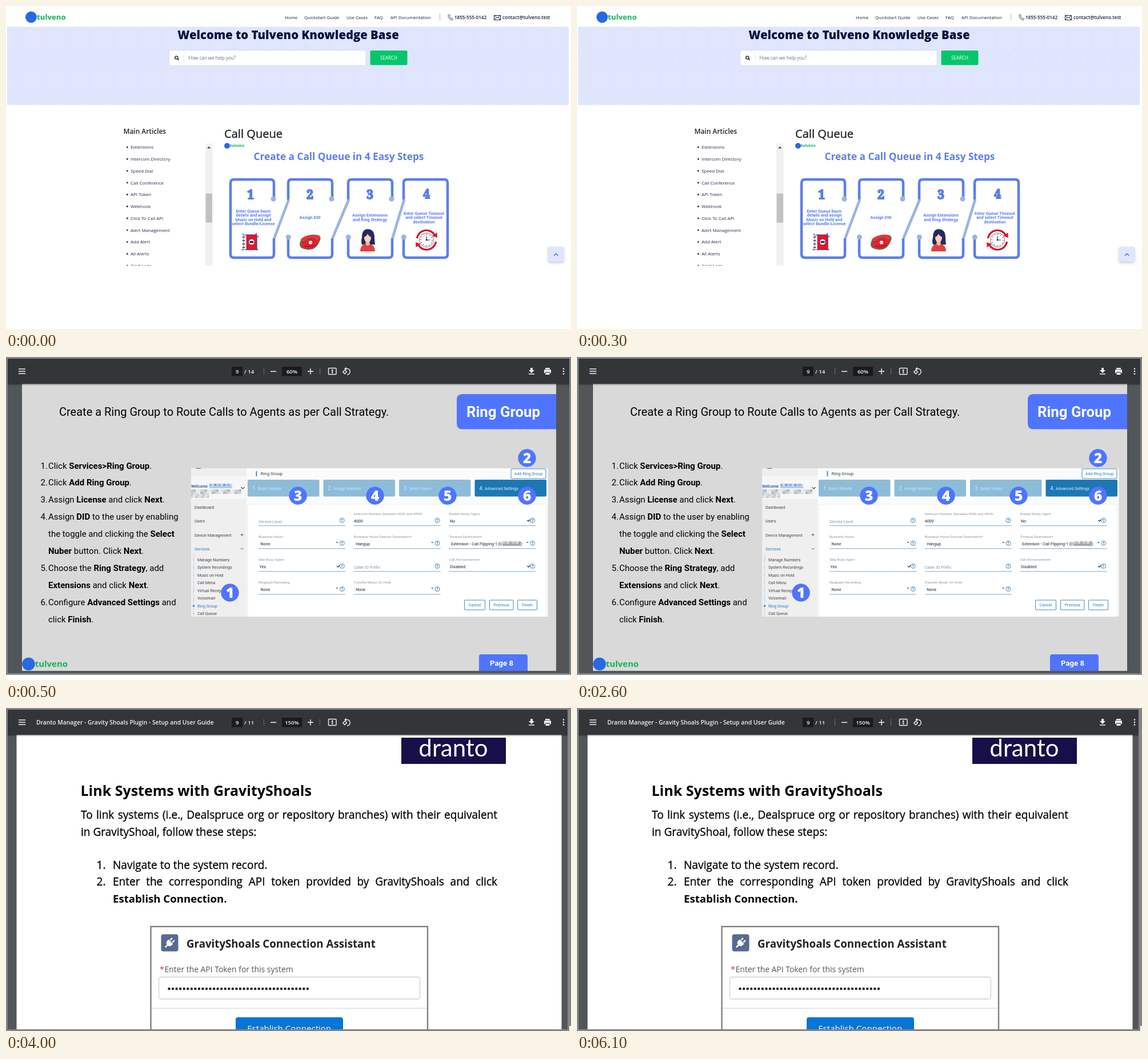
Animation of 989x566 px, one loop 7500 ms. Source, as an HTML page:

```html
<!DOCTYPE html>
<html lang="en">
<head>
<meta charset="utf-8">
<title>Help pages</title>
<style>
  html, body { margin: 0; width: 100%; height: 100%; overflow: hidden; background: #fff; }
  svg { display: block; width: 989px; height: 566px; }
  .open { font-family: "Open Sans", "Noto Sans", sans-serif; }
  .roboto { font-family: Roboto, Arial, sans-serif; }
  .justify { font: 19.06px/29.2px "Open Sans", "Noto Sans", sans-serif; text-align-last: justify; white-space: nowrap; -webkit-text-stroke: .3px #000; }
</style>
</head>
<body>
<svg id="stage" viewBox="0 0 989 566"></svg>
<script>
const BLUE = '#4f74ff', CARD = '#5b7fe8', PALE = '#9db3e0', LINK = '#2e7cb8', RED = '#e0182d';

// Markup helpers; {braces} in a text mark a bold run.
const text = (x, y, size, str, fill = '#000', more = '') =>
  `<text x="${x}" y="${y}" font-size="${size}" fill="${fill}" ${more}>` +
  str.replace(/{(.+?)}/g, '<tspan font-weight="700">$1</tspan>') + '</text>';
const rect = (x, y, w, h, fill, more = '') =>
  `<rect x="${x}" y="${y}" width="${w}" height="${h}" fill="${fill}" ${more}/>`;
const circle = (x, y, r, fill, more = '') => `<circle cx="${x}" cy="${y}" r="${r}" fill="${fill}" ${more}/>`;
const path = (d, stroke, width = 1, more = 'fill="none"') =>
  `<path d="${d}" stroke="${stroke}" stroke-width="${width}" ${more}/>`;
const shape = (d, fill) => `<path d="${d}" fill="${fill}"/>`;
const group = (cls, ...parts) => `<g class="${cls}">${parts.flat(2).join('')}</g>`;
const outline = (color, width) => `stroke="${color}" stroke-width="${width}"`;
const MID = 'text-anchor="middle"', BOLD = 'font-weight="700"', SEMI = 'font-weight="600"';

const brand = (x, y, r) => group('open',
  circle(x, y, r, '#2869e2'),
  text(x + r, y + r * .48, r * 1.32, 'tulveno', '#0fb457', BOLD));

const mosaic = (x, y, cols, rows, size, colors) =>
  Array.from({ length: cols * rows }, (_, k) => {
    const i = k % cols, j = Math.floor(k / cols);
    return rect(x + i * size, y + j * size, size, size, colors[(i * 7 + j * 5 + i * j) % colors.length]);
  }).join('');

// ---------- knowledge base ----------
function knowledgeBase() {
  const nav = [[488, 'Home'], [522, 'Quickstart Guide'], [596, 'Use Cases'], [645, 'FAQ'], [673, 'API Documentation']];
  const articles = ['Extensions', 'Intercom Directory', 'Speed Dial', 'Call Conference', 'API Token', 'Webhook',
    'Click To Call API', 'Alert Management', 'Add Alert', 'All Alerts', 'Alert Logs'];
  const ink = '#1c2140';

  const header = [
    rect(0, 0, 989, 37, '#fff'), rect(2, 36.5, 983, 1, '#e3e6f0'),
    brand(44, 19.5, 10),
    nav.map(([x, label]) => text(x, 22.5, 7.85, label, ink)),
    rect(759, 13, 1, 12, '#b9bcc8'),
    path('M774 16l2-1 1.5 2.5-1 1.5q.8 2 2.8 3l1.5-.8 1.5 2-1 1.5q-2 .6-5-2.5t-2.3-6.2z', ink, .8),
    text(785, 22.5, 8.1, '1855-555-0142', ink, SEMI),
    path('M854.5 16.5h11v8h-11zl5.5 4.5 5.5-4.5M854.5 24.5l4-4.5M865.5 24.5l-4-4.5', ink, 1),
    text(869, 22.5, 8.1, 'contact@tulveno.test', ink, SEMI)];

  const hero = [
    rect(2, 37, 983, 136.5, '#dfe6fd'), rect(2, 37, 983, 136.5, 'url(#cubes)'),
    text(494, 58, 20.3, 'Welcome to Tulveno Knowledge Base', '#051040', MID + ' font-weight="800"'),
    rect(286.5, 78.5, 343, 25, '#fff', 'rx="2"'), rect(311, 83, .8, 16, '#e4e6ea'),
    circle(298.3, 90.5, 2.6, 'none', outline('#222', 1.4)), path('M300.3 92.5l2.3 2.3', '#222', 1.6),
    text(319.5, 94, 8.03, 'How can we help you?', '#6b7280'),
    rect(637.5, 78, 65, 25.5, '#06c66c', 'rx="2"'),
    text(670, 94, 8.05, 'SEARCH', '#fff', MID)];

  const sidebar = [
    text(205.5, 224, 11.9, 'Main Articles', '#212529', SEMI),
    '<g clip-path="url(#list)">', articles.map((label, i) => {
      const y = 247.4 + i * 20.77;
      return circle(212.3, y, 1.4, ink) + text(218, y + 2.8, 7.95, label, '#252a48');
    }), '</g>',
    rect(349, 241, 12.5, 214, '#f1f1f1'), rect(349.5, 328.5, 11.5, 51, '#c1c1c1'),
    shape('M352 249.5l3.2-3.5 3.2 3.5z', '#444')];

  const article = [
    text(382, 231, 20.1, 'Call Queue', '#212529', outline('#212529', .4)),
    brand(387, 245, 5),
    text(582.5, 270, 17.2, 'Create a Call Queue in 4 Easy Steps', CARD, MID + ' ' + BOLD),
    steps()];

  const toTop = [
    rect(949, 422, 27, 26, '#dfe6fd', 'rx="3" filter="url(#soft)"'),
    path('M959 437.5l3.7-3.5 3.7 3.5', '#4a63d8', 1.3)];

  return group('open', rect(0, 0, 989, 566, '#fff'), hero, header, sidebar, article, toTop);
}

function steps() {
  const cards = [[393, 469], [494, 571], [599, 676], [696, 773]];
  const top = 304, bottom = 441, r = 6;
  const captions = [
    [433, 361.7, ['Enter Queue basic', 'details and assign', 'Music on Hold and', 'select Bundle/License']],
    [532, 373, ['Assign DID']],
    [637, 369, ['Assign Extensions', 'and Ring Strategy']],
    [731.5, 365.6, ['Enter Queue Timeout', 'and select Timeout', 'destination']]];
  const frames = cards.map(([left, right], i) => {
    const first = i === 0, last = i === 3;
    const upper = `M${left} ${first ? 372 : 340}V${top + r}q0-${r} ${r}-${r}H${right - r}q${r} 0 ${r} ${r}V${last ? 372 : 338}`;
    const lower = `M${left} ${first ? 372 : 405}V${bottom - r}q0 ${r} ${r} ${r}H${right - r}q${r} 0 ${r}-${r}V${last ? 372 : 407}`;
    return path(upper + lower, CARD, 4.5);
  });
  const links = cards.slice(1).map(([left], i) => {
    const right = cards[i][1];
    return path(`M${left + 1} 339L${right + .5} 407`, PALE, 4.6) +
      circle(right - 1, 338, 4.5, PALE) + circle(left + .3, 405, 4.5, PALE);
  });
  const numbers = [428, 532, 637, 736].map((x, i) =>
    text(x, i === 3 ? 336.5 : 337.5, 21, String(i + 1), CARD,
      `${MID} font-weight="900" font-family="Noto Serif, serif" ${outline(CARD, 1.8)}`));
  const labels = captions.map(([x, y, lines]) =>
    lines.map((line, i) => text(x, y + i * 7.5, 7.5, line, CARD, MID + ' ' + BOLD)));
  return frames.join('') + links.join('') + numbers.join('') + group('roboto', labels) + icons();
}

function icons() {
  const navy = '#26305c';
  const book = [
    rect(420, 401, 19, 26, '#f0102a', outline(navy, 1)), rect(416, 402, 5, 25, '#fff', outline(navy, .7)),
    [405, 411, 417, 423].map(y => path(`M413.5 ${y}h5`, navy, 1.4)),
    circle(430, 413.5, 5.2, '#fff', outline(navy, .7)), rect(426.5, 411.8, 7, 3.4, navy, 'rx="1"'),
    [[415, 400], [438, 399], [441, 404], [414, 427], [440, 427]].map(([x, y]) => path(`M${x - 1.5} ${y}h3m-1.5-1.5v3`, navy, .8))];
  const phone = [
    shape('M514 417q1-9 9-13 14-6 25-2 4 3 2 8-4 12-13 16-11 3-20-2-3-2-3-7z', '#1c9a4c'),
    shape('M515.5 418q3-8 10-10l21-3q4 2 2 6-4 10-12 14-11 2-18-2-3-2-3-5z', '#ea2030'),
    shape('M516 409q8-9 27-8 7 1 6 6l-6 3q-2-5-9-4-7 0-8 5l-8 2q-3-1-2-4z', '#f0303c'),
    path('M516 413q4 2 9-1 1-5 9-5 6 0 9 4', '#17643a', .8),
    circle(533, 414.5, 4.2, '#ffd9d4', outline('#a91525', 1.5)),
    path('M522 420q9 4 20-1', '#8d1020', 1.1)];
  const woman = [
    shape('M623 418q-2-6 0-12 0-15 10-15 12 0 12 15 0 7 1 12z', '#222b61'),
    shape('M620 430q0-11 9-13h8q9 2 9 13z', '#e5403f'),
    shape('M629.5 411h7v7q-3.5 4-7 0z', '#f2b99c'),
    '<ellipse cx="633" cy="406" rx="6" ry="8" fill="#ffd0b5"/>',
    shape('M626 405q1-8 8-9 6 2 6 9-5-1-7-6-2 5-7 6z', '#222b61')];
  const arrows = 'M719.5 407a16.5 16.5 0 0 1 31-5M752.5 413a16.5 16.5 0 0 1-31 5';
  const clock = [
    circle(736, 410, 12.5, '#fff', outline('#666', .9)),
    circle(736, 410, 10, 'none', outline('#444', 1.8) + ' stroke-dasharray="1 4.236"'),
    path('M736 403v7h6', '#333', 1.1), circle(736, 410, 1.4, '#333'),
    path(arrows, '#7d2730', 3.2), path(arrows, RED, 2.2),
    shape('M746 403l9 3-.5-9zM726 417l-9-3 .5 9z', RED)];
  return [book, phone, woman, clock].flat(2).join('');
}

// ---------- document viewer ----------
function viewer(bottom, right, title, pages, zoom) {
  const white = '#f1f1f1', box = '#191b1c';
  return group('open',
    rect(0, 0, 989, bottom, '#848484'), rect(3, 3, right - 3, bottom - 6, '#525659'),
    rect(3, 3, right - 3, 44, '#323639'),
    path('M22 21h12M22 25h12M22 29h12', white, 1.6),
    text(53, 29.3, 10.3, title, white, SEMI),
    rect(395, 17, 19, 16.5, box), text(404.7, 29, 9.7, '9', white, MID + ' ' + SEMI),
    text(417, 29, 9.7, '/ ' + pages, white, SEMI),
    rect(451, 19, 1, 12, '#6b6e71'), path('M463 25.3h10', white, 1.5),
    rect(483, 17, 35, 16.5, box), text(500.5, 29, 9.6, zoom, white, MID + ' ' + SEMI),
    path('M528 25.3h10M533 20.3v10', white, 1.5), rect(549, 19, 1, 12, '#6b6e71'),
    rect(564.5, 19.5, 13.5, 11, 'none', 'rx="1" ' + outline(white, 1.4)),
    shape('M571.2 21.3l2 2.5h-4zM571.2 29l2-2.5h-4zM570.5 23h1.4v4h-1.4z', white),
    path('M593 20.5h4a5 5 0 0 1 0 10.5M593 23l3.4 3.3-3.4 3.3-3.3-3.3z', white, 1.4),
    shape('M595.5 17.5v6l-3.3-3z', white),
    shape('M918 19h4v4h3l-5 5-5-5h3zM915 29h10v1.6h-10z', white),
    shape('M944 19h8v2.5h-8zM942 22.3h12v6h-2v-2h-8v2h-2zM944.5 27.5h7v3.5h-7z', white),
    [20.5, 25, 29.5].map(y => circle(976, y, 1.35, white)));
}

const toolbarShadow = right => rect(3, 47, right - 3, 3, 'url(#shade)');

// ---------- ring group page ----------
function ringGroup() {
  const lines = ['Click {Services&gt;Ring Group}.', 'Click {Add Ring Group}.', 'Assign {License} and click {Next}.',
    'Assign {DID} to the user by enabling', 'the toggle and clicking the {Select}', '{Nuber} button. Click {Next}.',
    'Choose the {Ring Strategy}, add', '{Extensions} and click {Next}.', 'Configure {Advanced Settings} and', 'click {Finish}.'];
  const numbered = [0, 1, 2, 3, 6, 8];
  const badges = [[392, 413], [912, 177], [511, 243], [646, 243], [773, 243], [912, 243]];
  return viewer(557, 986, '', 14, '60%') + group('roboto',
    rect(28, 47, 935, 503, '#d9d9d9'), toolbarShadow(986),
    text(93, 103, 20, 'Create a Ring Group to Route Calls to Agents as per Call Strategy.'),
    shape('M963 65H799q-10 0-10 10v41.5q0 10 10 10H963z', BLUE),
    text(870.5, 105, 25.8, 'Ring Group', '#fff', MID + ' ' + BOLD),
    lines.map((line, i) => text(74, 195.5 + i * 29.95, 15, line)),
    numbered.map((row, i) => text(60.5, 195.5 + row * 29.95, 15, i + 1 + '.')),
    settings(),
    badges.map(([x, y], i) =>
      circle(x, y, 15.7, BLUE) + text(x, y + 9, 25, String(i + 1), '#fff', MID + ' class="open" font-weight="800"')),
    shape('M828 550V525q0-4 4-4h77q4 0 4 4v25z', BLUE),
    text(867.5, 541, 13.2, 'Page 8', '#fff', MID + ' ' + BOLD),
    brand(39.5, 538, 11.3));
}

function settings() {
  const dark = '#3c4043', gray = '#8d9298';
  const menu = ['Manage Numbers', 'System Recordings', 'Music on Hold', 'Call Menu', 'Virtual Recep', 'Voicemail', 'Ring Group', 'Call Queue'];
  const tabs = ['Basic Details', 'Assign Number', 'Select Users', 'Advanced Settings'];
  // Label, value and selector kind ('a' arrow, 'c' chevron), row by row.
  const fields = [
    ['', 'Service Level'], ['Intercom Number (between 4000 and 4999)', '4000'], ['Enable Sticky Agent', 'No', 'c'],
    ['Business Hours', 'None', 'a'], ['Business Hours Failover Destination*', 'Hangup', 'a'], ['Timeout Destination*', 'Extension - Call Flipping-1 (01', 'a'],
    ['Skip Busy Agent', 'Yes', 'c'], ['', 'Caller ID Prefix'], ['Call Announcement', 'Disabled', 'c'],
    ['Ringback Recording', 'None', 'a'], ['Transfer Music On Hold', 'None', 'a']];
  const button = (x, y, w, label) =>
    rect(x, y, w, 17, '#fff', 'rx="1" ' + outline(LINK, .9)) + text(x + w / 2, y + 11, 7.1, label, LINK, MID);

  const side = [
    rect(324, 195, 97.5, 260, '#efeff0'), rect(333, 194.5, 8, 1.3, '#3a9b78'),
    rect(324, 209, 97.5, 40, '#f7f7f8'),
    text(324, 229, 7, 'Welcome', '#2148b8', 'font-weight="500"'),
    mosaic(356, 222, 10, 2, 4, ['#8fb3ea', '#b5cbee', '#76a0e2', '#cfdcf2']),
    mosaic(324, 232, 22, 2, 4, ['#c9cbcf', '#e3e4e6', '#b4b7bc', '#d6d8db', '#eeeef0']),
    mosaic(324, 240, 9, 2, 3.5, ['#c4c6ca', '#e6e7e9', '#d3d5d8']),
    path('M411.5 228l3 3 3-3', '#444', 1.1),
    [['Dashboard', 265.7], ['Users', 290], ['Device Management', 314.6], ['Services', 339.2]].map(([label, y], i) =>
      text(330, y, 7.1, label, i === 3 ? LINK : dark)),
    path('M410.5 311.5h5M413 309v5M410.5 336h5', '#555', .9),
    path('M328.5 346V455', '#b9cfdf', .8),
    menu.map((label, i) => {
      const y = 358 + i * 13.45, active = i === 6;
      return circle(328.5, y - 2.5, active ? 1.6 : 1, active ? LINK : '#a9c6db') + text(335, y, 7.1, label, active ? LINK : dark);
    })];

  const main = [
    rect(437.5, 200, 1.8, 9, '#2b84c8'), text(445.5, 207.3, 7.9, 'Ring Group', dark), button(884, 196, 61, 'Add Ring Group'),
    tabs.map((label, i) => {
      const x = 423 + i * 132.5, ink = i === 3 ? '#e4f0f8' : '#d3e6f1';
      return rect(x, 215, 125.5, 29.5, i === 3 ? '#1c78b4' : '#8dbcd9', 'rx="2"') +
        text(x + 8, 232.8, 9, i + 1 + '.', ink) + text(x + 17.5, 232.6, 7.1, label, ink);
    }),
    rect(423, 258, 523, 200, '#fff', 'rx="3" ' + outline('#e4e6e8', .8)),
    fields.map(([label, value, kind], i) => {
      const x = 442 + (i % 3) * 166.7, y = 295.5 + Math.floor(i / 3) * 40.1;
      const indent = kind === 'a' ? 3.5 : kind === 'c' ? 1.5 : 0;
      return text(x, y - 18.8, 6.2, label, gray) +
        text(x + indent, y - (label ? 6 : 5), 7.1, value, label ? '#222' : gray) +
        rect(x, y - .3, 152, .9, '#6a9fc4') +
        circle(x + 146.3, y - 9.3, 4, '#fff', outline(LINK, .9)) +
        text(x + 146.3, y - 6.8, 6.8, '?', LINK, MID + ' ' + BOLD) +
        (kind === 'a' ? shape(`M${x + 135.5} ${y - 11.5}h4l-2 2.2z`, '#555') : '') +
        (kind === 'c' ? path(`M${x + 137} ${y - 9.5}l2 2 3-3`, '#222', 1.2) : '');
    }),
    mosaic(869, 323, 8, 2, 4, ['#cfcfd1', '#a8a8ac', '#dededf', '#bcbcc0']), text(901, 329.6, 7.1, ')', '#222'),
    button(802.5, 426, 36, 'Cancel'), button(846.5, 426, 41.5, 'Previous'), button(895.5, 426, 34, 'Finish')];

  return `<g clip-path="url(#shot)">${[rect(324, 195, 624.5, 260, '#fbfbfb'), side, main].flat(2).join('')}</g>`;
}

// ---------- link systems page ----------
function linkSystems() {
  const justified = (x, baseline, str) =>
    `<foreignObject x="${x}" y="${baseline - 22}" width="${860 - x}" height="32"><div class="justify">${str}</div></foreignObject>`;
  const body = (x, y, str) => text(x, y, 19.06, str, '#000', outline('#000', .3));
  return rect(0, 557, 989, 9, '#fff') +
    viewer(566, 983, 'Dranto Manager - Gravity Shoals Plugin - Setup and User Guide', 11, '150%') +
    rect(986, 557, 3, 9, '#fff') + group('open',
      '<g clip-path="url(#page)">',
      rect(18.5, 47, 954, 520, '#fff'), toolbarShadow(983),
      rect(692, 52, 183, 46, '#170f4a'),
      text(783, 85, 42, 'dranto', '#fff', MID + ' font-family="Lato, sans-serif"'),
      text(130.5, 154, 25, 'Link Systems with GravityShoals', '#000', BOLD),
      justified(131, 194.7, 'To link systems (i.e., Dealspruce org or repository branches) with their equivalent'),
      body(131, 223.7, 'in GravityShoal, follow these steps:'),
      body(158.5, 282, '1.'), body(187, 282, 'Navigate to the system record.'),
      body(158.5, 311.4, '2.'),
      justified(187, 311.7, 'Enter the corresponding API token provided by GravityShoals and click'),
      text(187, 341, 18.6, 'Establish Connection.', '#000', BOLD),
      rect(253.5, 383, 484.5, 200, '#fff', outline('#7f7f7f', 2.4)),
      rect(271.5, 396.5, 30, 30, '#566a93', 'rx="4"'),
      '<g transform="translate(286.5 411.5) rotate(45)">',
      shape('M-5.5-3h11v3q0 5-4 5.5h-3q-4-.5-4-5.5zM-4-9h2.5v5H-4zM1.5-9H4v5H1.5zM-1.2 5h2.4v6h-2.4z', '#fff'), '</g>',
      text(316, 419.5, 18.7, 'GravityShoals Connection Assistant', '#222', BOLD),
      text(269, 462.5, 13.9, '*', '#c23934'), text(277.5, 462.5, 13.9, 'Enter the API Token for this system', '#555'),
      rect(267.5, 471.5, 457, 38.5, '#fff', 'rx="4" ' + outline('#cfcfcf', 1.3)),
      path('M285.5 492H528.5', '#222', 4.6, 'stroke-dasharray="0 6.55" stroke-linecap="round"'),
      rect(255, 525.5, 482, 1.2, '#d4d4d4'),
      rect(402, 542, 188, 40, '#0575d6', 'rx="4"'),
      text(495.7, 567, 15.1, 'Establish Connection', '#fff', MID),
      '</g>');
}

const defs = `<defs>
  <pattern id="cubes" width="42" height="72" patternUnits="userSpaceOnUse">
    <path d="M0 12L21 0 42 12V36L21 48 0 36zL21 24 42 12M21 24V72" fill="none" stroke="#dae1fa" stroke-width=".9"/></pattern>
  <linearGradient id="shade" x2="0" y2="1"><stop stop-opacity=".4"/><stop offset="1" stop-opacity="0"/></linearGradient>
  <filter id="soft" x="-50%" y="-50%" width="200%" height="200%"><feDropShadow dx="0" dy="2" stdDeviation="2.5" flood-color="#506090" flood-opacity=".35"/></filter>
  <clipPath id="list"><rect x="200" y="238" width="149" height="217"/></clipPath>
  <clipPath id="shot"><rect x="324" y="194" width="625" height="261"/></clipPath>
  <clipPath id="page"><rect x="3" y="47" width="980" height="516"/></clipPath>
</defs>`;

const stage = document.getElementById('stage');
const scenes = [[0, knowledgeBase], [500, ringGroup], [4000, linkSystems]];
stage.innerHTML = defs + scenes.map(([, draw]) => `<g class="scene">${draw()}</g>`).join('');
const layers = [...stage.querySelectorAll('.scene')];

function show() {
  const time = performance.now() % 7500;
  const current = scenes.findLastIndex(([start]) => time >= start);
  layers.forEach((layer, i) => { layer.style.display = i === current ? '' : 'none'; });
  requestAnimationFrame(show);
}
show();
</script>
</body>
</html>
```
